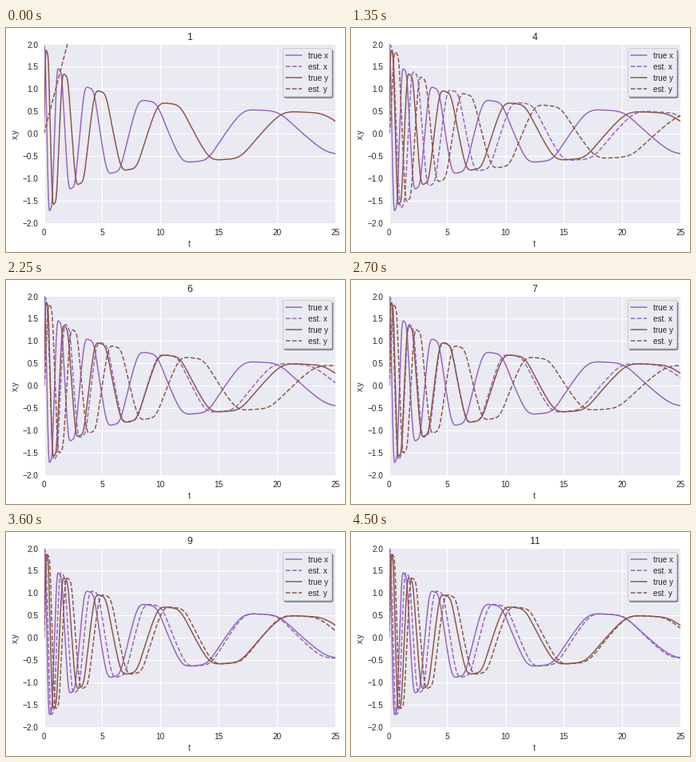
Write a matplotlib script that moves like this. It is 424 px wide and 280 px high and loops after 4950 ms.

```python
import numpy as np
import matplotlib.pyplot as plt
from matplotlib.animation import FuncAnimation

W, H = 424, 280
INK, PANEL = "0.15", "#eaeaf2"
PURPLE, BROWN = "#9467bd", "#8c564b"

plt.rcParams.update({
    "font.family": "Liberation Sans", "font.size": 10,
    "text.color": INK, "axes.labelcolor": INK,
    "text.kerning_factor": 6,
    "xtick.color": INK, "ytick.color": INK,
    "axes.facecolor": PANEL, "axes.edgecolor": "white",
    "axes.axisbelow": True, "axes.grid": True,
    "grid.color": "white", "grid.linewidth": 1,
    "xtick.major.size": 0, "ytick.major.size": 0,
    "xtick.major.pad": 7, "ytick.major.pad": 7,
    "lines.linewidth": 1.5, "lines.solid_capstyle": "round",
})


def field(state):
    x3, y3 = state ** 3
    return np.array([-0.1 * x3 - 2 * y3, 2 * x3 - 0.1 * y3])


def integrate(start, dt, steps):
    """Runge-Kutta solution of the cubic spiral."""
    path = [np.array(start, float)]
    for _ in range(steps):
        s = path[-1]
        k1 = field(s)
        k2 = field(s + dt / 2 * k1)
        k3 = field(s + dt / 2 * k2)
        k4 = field(s + dt * k3)
        path.append(s + dt / 6 * (k1 + 2 * k2 + 2 * k3 + k4))
    return np.array(path).T


DT, STEPS = 0.01, 2700
time = np.arange(STEPS + 1) * DT
true_x, true_y = integrate((2, 0), DT, STEPS)

# Key points of the fit: early delay, late drift and loss of height.
KEY_STEPS = [2, 3, 5, 7, 8, 9, 11]
DELAY = [1.45, 0.95, 0.63, 0.48, 0.31, 0.22, 0.21]
DRIFT = [0.009, 0.006, -0.001, 0.003, 0, -0.0027, -0.0022]
LOSS = [0.06, 0.06, 0.08, 0.08, 0.035, 0, 0]


def estimate(step):
    """The true path, lagging and flattened less and less as training goes on."""
    if step == 1:
        return time, 2 + time, time
    delay, drift, loss = (np.interp(step, KEY_STEPS, values)
                          for values in (DELAY, DRIFT, LOSS))
    lag = delay * np.sqrt(time) + drift * time ** 2
    gain = 1 - loss * time / (time + 0.5)
    return time + lag, gain * true_x, gain * true_y


fig = plt.figure(figsize=((W + 1e-6) / 72, (H + 1e-6) / 72), dpi=72,
                 facecolor="white")
left, right, top, bottom = 47.5, 412, 20.5, 244
ax = fig.add_axes([left / W, 1 - bottom / H, (right - left) / W, (bottom - top) / H])
ax.set(xlim=(0, 25), ylim=(-2, 2), xlabel="t", ylabel="x,y",
       xticks=range(0, 26, 5), yticks=np.arange(-2, 2.1, 0.5))
ax.spines[:].set_visible(False)

ax.plot(time, true_x, color=PURPLE, label="true x")
est_x, = ax.plot([], [], "--", color=PURPLE, label="est. x")
ax.plot(time, true_y, color=BROWN, label="true y")
est_y, = ax.plot([], [], "--", color=BROWN, label="est. y")
ax.legend(loc="upper right", frameon=True, fancybox=True, shadow=True,
          labelspacing=0.4)
title = ax.set_title("1", fontsize=12)


def update(frame):
    t, x, y = estimate(frame + 1)
    est_x.set_data(t, x)
    est_y.set_data(t, y)
    title.set_text(str(frame + 1))
    return est_x, est_y, title


anim = FuncAnimation(fig, update, frames=11, interval=450, repeat=True,
                     repeat_delay=0, blit=False)
plt.show()
```
